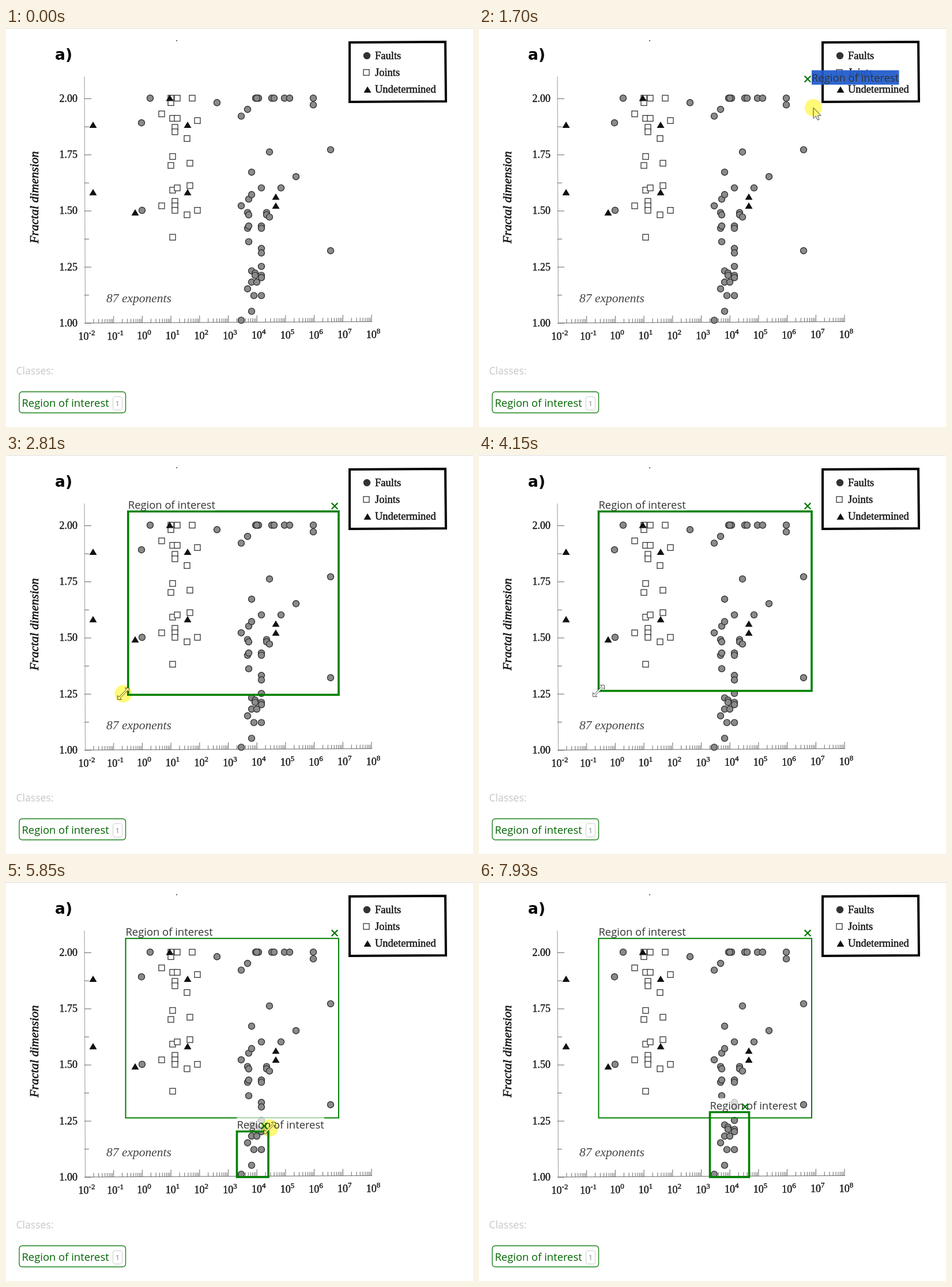
These frames come from a looping animation (810x691 px, 8000 ms). An HTML page:

```html
<!DOCTYPE html>
<html lang="en">
<head>
<meta charset="utf-8">
<title>Region selection</title>
<style>
html, body { margin: 0; width: 100%; height: 100%; overflow: hidden; background: #fff; }
svg { display: block; }
.ui { font: 18.4px "Open Sans", "Noto Sans", sans-serif; fill: #333; }
.serif { font: 18px "Liberation Serif", serif; fill: #151515; stroke: #151515; stroke-width: .4; }
.legend { font-size: 18.5px; stroke-width: .5; }
.title { font: italic 21.7px "Liberation Serif", serif; stroke-width: .6; }
.note { font: italic 21.5px "Liberation Serif", serif; fill: #444; stroke: none; }
.sup { font-size: 13px; }
</style>
</head>
<body>
<svg width="810" height="691" viewBox="0 0 810 691">
  <path d="M0 .5H810" stroke="#ddd"/>
  <circle cx="296" cy="22" r="1" fill="#333"/>
  <text x="85" y="55" font-family="DejaVu Sans, sans-serif" font-weight="bold" font-size="26.5">a)</text>
  <g id="plot"></g>
  <g class="serif">
    <text class="title" transform="translate(56 373) rotate(-90)">Fractal dimension</text>
    <text class="note" x="174" y="475">87 exponents</text>
    <path d="M596 25L762 24L763 127L596 128Z" fill="none" stroke="#000" stroke-width="4"/>
    <g class="legend">
      <text x="640" y="54">Faults</text>
      <text x="640" y="83">Joints</text>
      <text x="640" y="112">Undetermined</text>
    </g>
  </g>
  <g class="ui">
    <text x="17.5" y="600" style="font-size:17.6px;fill:#c6c6c6">Classes:</text>
    <rect x="23" y="630" width="184.5" height="36.5" rx="5" fill="#fff" stroke="#1b821b" stroke-width="1.4"/>
    <text x="27.5" y="656" style="fill:#006400">Region of interest</text>
    <rect x="185.5" y="638.5" width="16" height="23" rx="3" fill="#fff" stroke="#ccc"/>
    <text x="193.5" y="655" text-anchor="middle" style="font-size:13px;fill:#888">1</text>
  </g>
  <g id="boxes"></g>
  <path id="arrow" d="M0 0V18.5L4.4 14.5L7.2 21.3L10.1 20.1L7.3 13.5H13.2Z" fill="#fff" stroke="#444"/>
  <path id="resize" d="M10-10H3L5.5-7.5L-7.5 5.5L-10 3V10H-3L-5.5 7.5L7.5-5.5L10-3Z" fill="#fff" stroke="#555"/>
  <circle id="press" r="15" fill="#fff978" style="mix-blend-mode:multiply"/>
</svg>
<script>
const $ = id => document.getElementById(id);

// columns of the scatter plot, "x: dimensions in hundredths"
const faults = `250:200 235:189 236:150 366:198 408:192,152,101 419:195,149,142,115 421:155,148,143,136
  426:167,157,123,118,105 430:112 432:122,121 433:200 438:200 435:200,118 443:160,143,142,133,131,125,121,120,112
  452:149,148 457:176,147 461:200 465:200 477:160 483:200 492:200 503:165 533:200,197 563:177,132`;
const joints = `270:193,152 286:200,198,170 289:191,174,159,138 293:187,185,154,152,150 297:200,191,160
  314:182,148 319:171,161 323:200 332:190,150`;
const unknown = "151:188,158 224:149 284:200 315:188,158 468:156,152";

const dimY = d => 121.5 + (200 - d) * 3.885;
const scatter = (columns, mark) => columns.split(/\s+/).map(column => {
  const [x, dims] = column.split(":");
  return dims.split(",").map(d => mark(+x, dimY(d))).join("");
}).join("");

const circle = (x, y, fill = "#8b8b8b") =>
  `<circle cx="${x}" cy="${y}" r="5.5" fill="${fill}" stroke="#333" stroke-width="1.4"/>`;
const square = (x, y) =>
  `<rect x="${x - 5}" y="${y - 5}" width="10" height="10" fill="#fff" stroke="#333" stroke-width="1.3"/>`;
const triangle = (x, y) => `<path d="M${x} ${y - 6}l6.5 11h-13z" fill="#111"/>`;

function drawPlot() {
  let ticks = "", text = "";
  for (let i = 0; i <= 8; i++) ticks += `M136 ${122.5 + i * 48.6}h${i % 2 ? 8 : 12}`;
  for (let i = 0; i < 5; i++)
    text += `<text x="124" y="${128 + i * 97.2}" text-anchor="end">${(2 - i / 4).toFixed(2)}</text>`;
  for (let d = 0; d <= 10; d++) {
    const x = 137 + d * 49.7, y = 511 - d * .25;
    if (d) ticks += `M${x} ${y}v-12`;
    if (d < 10) for (let k = 2; k < 10; k++) ticks += `M${x + 49.7 * Math.log10(k)} ${y}v-7`;
    text += `<text x="${x + 3}" y="${540 - d * .3}" text-anchor="middle">10<tspan class="sup" dy="-8">${d - 2}</tspan></text>`;
  }
  $("plot").innerHTML = `<path d="M136 84L137.5 511" stroke="#999"/>
    <path d="M137.5 511L635 508.5${ticks}" fill="none" stroke="#666"/>
    <g class="serif">${text}</g>` +
    scatter(faults, circle) + scatter(joints, square) + scatter(unknown, triangle) +
    circle(626, 48, "#333") + square(625, 77) + triangle(627, 107);
}

// pointer keys: time, x, y
const path = [
  [130, 752, 667], [700, 590, 150], [940, 585, 108], [1290, 577, 99], [1560, 577, 99], [1700, 580, 138],
  [1780, 580, 145], [2190, 379, 432], [2250, 364, 438], [2780, 203, 414], [3150, 207.5, 408.5],
  [4160, 207.5, 408.5], [4700, 428, 508], [4970, 410, 490], [5380, 400.5, 511], [5580, 400.5, 511],
  [5790, 455, 432], [6130, 468.5, 398.5], [7530, 468.5, 398.5], [7930, 469, 402]];

function pointer(t) {
  const i = Math.max(1, path.findIndex(p => p[0] > t));
  const [t0, x0, y0] = path[i - 1], [t1, x1, y1] = path[i];
  const u = Math.max(0, (t - t0) / (t1 - t0));
  return [x0 + (x1 - x0) * u, y0 + (y1 - y0) * u];
}

function box(x0, y0, x1, y1, active) {
  const x = Math.min(x0, x1), y = Math.min(y0, y1), w = Math.abs(x1 - x0), h = Math.abs(y1 - y0);
  const empty = w < 2, cx = x + w - 7, cy = y - 9.3;
  const frame = empty ? "" : `<rect x="${x}" y="${y}" width="${w}" height="${h}" fill="none" stroke="green" stroke-width="${active ? 3.6 : 2}"/>`;
  return `${frame}
    <rect x="${x}" y="${y - 24.5}" width="151.5" height="${empty ? 25 : 23}" fill="${empty ? "#1f5bcc" : "#fff"}" opacity="${empty ? .93 : .7}"/>
    <text class="ui" x="${x}" y="${y - 4.8}">Region of interest</text>
    <path d="M${cx - 5.3} ${cy - 5.3}l10.6 10.6m0-10.6l-10.6 10.6" stroke="#0a780a" stroke-width="2.3"/>`;
}

// each box follows the pointer a little late, from press to release
const drags = [
  { from: 1560, to: 3550, x: 577, y: 97.7 },
  { from: 5580, to: 6860, x: 400.5, y: 511 }];
const lag = 60;

function render(t) {
  const [x, y] = pointer(t);
  const started = drags.filter(d => t >= d.from);
  $("boxes").innerHTML = started.map((d, i) => {
    const [bx, by] = pointer(Math.max(d.from, Math.min(t - lag, d.to)));
    return box(d.x, d.y, Math.min(bx, i ? bx : d.x), by, i == started.length - 1);
  }).join("");

  const sizing = t >= 1850 && t < 4220 || t >= 5650;
  const show = (id, on) => {
    $(id).setAttribute("transform", `translate(${x} ${y})`);
    $(id).setAttribute("visibility", on ? "visible" : "hidden");
  };
  show("press", drags.some(d => t >= d.from && t < d.to));
  show("arrow", t >= 130 && !sizing);
  show("resize", sizing);
}

drawPlot();
const start = performance.now();
function tick() {
  render((performance.now() - start) % 8000);
  requestAnimationFrame(tick);
}
tick();
</script>
</body>
</html>
```
